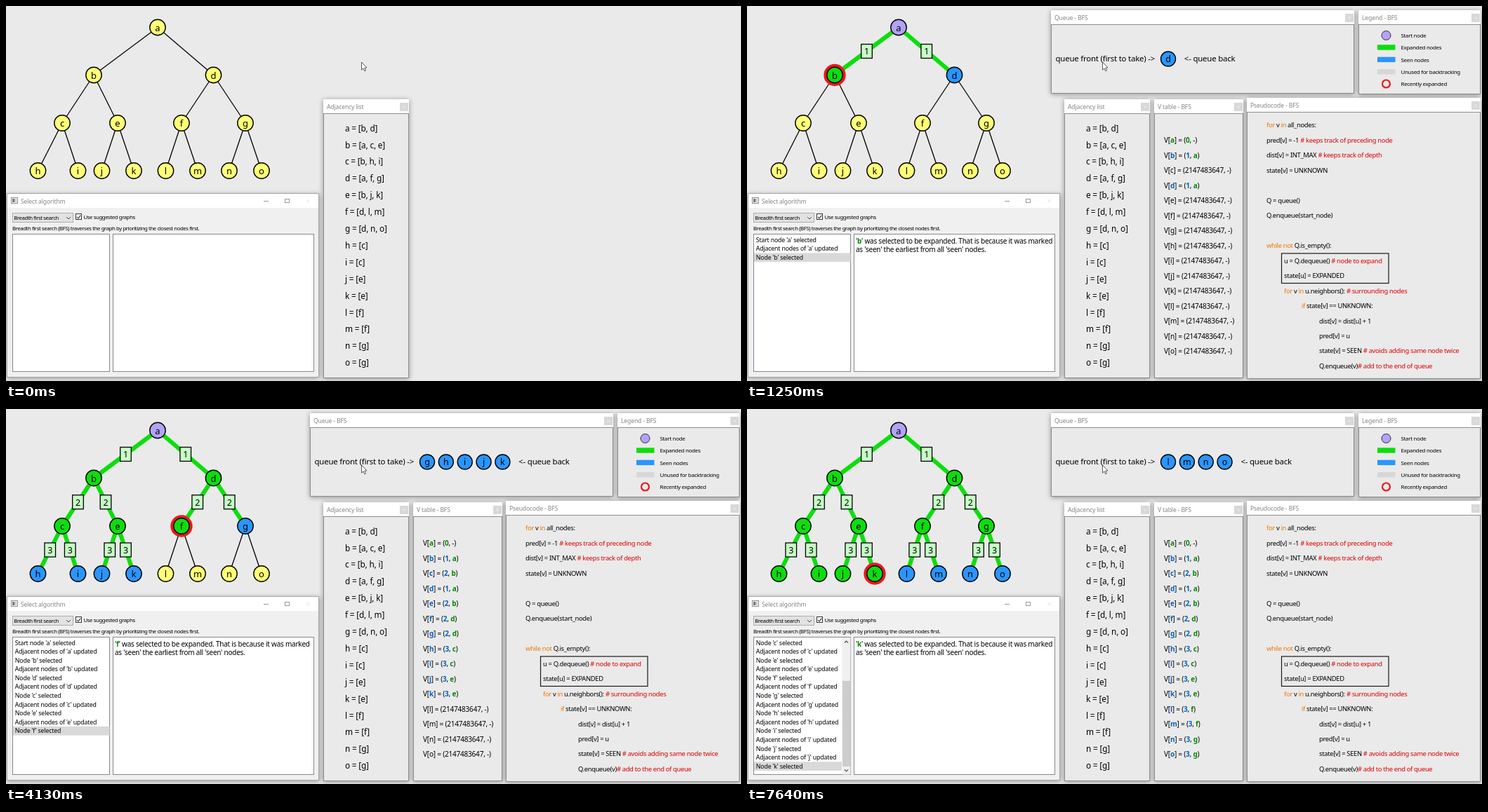
An HTML page with a canvas that plays this animation: 1047 px wide and 535 px high, repeating every 8000 ms.

```html
<!DOCTYPE html>
<html lang="en">
<head>
<meta charset="utf-8">
<title>Breadth first search</title>
<style>
  html, body { margin: 0; width: 100%; height: 100%; overflow: hidden; background: #eaeaea; }
  canvas { display: block; }
</style>
</head>
<body>
<canvas id="stage" width="1047" height="535"></canvas>
<script>
const ctx = document.getElementById('stage').getContext('2d');
const LOOP = 8000;
const OPEN = 550, READY = 640;
// start of each step: odd steps select a node, even steps update its neighbours
const TIMES = [720, 1020, 1250, 1570, 1880, 2280, 2580, 2970, 3350, 3680, 4130,
  4450, 4830, 5230, 5620, 5850, 6160, 6550, 6940, 7320, 7640];

const GREEN = '#0cde0c', BLUE = '#2a95ff', YELLOW = '#ffff78', PURPLE = '#b3a2f8';
const RED = '#f01616', ORANGE = '#ffb400', PAPER = '#eaeaea';
const INK_GREEN = '#008a00', INK_BLUE = '#0062c4', INK_RED = '#e00000', INK_ORANGE = '#f07800';

// [size, letter spacing]
const STYLE = {
  title: [8.6, -0.15], small: [7.8, -0.42], list: [8.8, -0.19], detail: [10, -0.24],
  code: [9.4, -0.33], table: [10, -0.2], adj: [11.8, -0.18], queue: [11.4, -0.19],
  legend: [7.9, -0.28], node: [13, 0], label: [12.5, 0]
};

const ORDER = 'abdcefghijklmno';
const KIDS = { a: 'bd', b: 'ce', d: 'fg', c: 'hi', e: 'jk', f: 'lm', g: 'no' };
const POS = {
  a: [216, 30.5], b: [125, 98.5], d: [295.5, 98.5],
  c: [80, 167], e: [159, 167], f: [250, 167], g: [341, 167],
  h: [45.5, 235], i: [102.5, 235], j: [136.5, 235], k: [182, 235],
  l: [227.5, 235], m: [273, 235], n: [318, 235], o: [364, 235]
};
const PARENT = {}, DEPTH = { a: 0 };
for (const p of ORDER) for (const k of KIDS[p] || '') {
  PARENT[k] = p;
  DEPTH[k] = DEPTH[p] + 1;
}

const CODE = [
  [0, 'for v in all_nodes:'],
  [0, 'pred[v] = -1 # keeps track of preceding node'],
  [0, 'dist[v] = INT_MAX # keeps track of depth'],
  [0, 'state[v] = UNKNOWN'],
  [0, ''],
  [0, 'Q = queue()'],
  [0, 'Q.enqueue(start_node)'],
  [0, ''],
  [0, 'while not Q.is_empty():'],
  [1, 'u = Q.dequeue() # node to expand'],
  [1, 'state[u] = EXPANDED'],
  [1, 'for v in u.neighbors(): # surrounding nodes'],
  [2, 'if state[v] == UNKNOWN:'],
  [3, 'dist[v] = dist[u] + 1'],
  [3, 'pred[v] = u'],
  [3, 'state[v] = SEEN # avoids adding same node twice'],
  [3, 'Q.enqueue(v)# add to the end of queue']
];

function setFont(style, bold) {
  const [size, gap] = STYLE[style];
  const weight = bold ? 700 : style === 'node' ? 500 : 400;
  ctx.font = `${weight} ${size}px "Noto Sans", "Open Sans", sans-serif`;
  ctx.letterSpacing = gap + 'px';
  return size;
}

// parts: a string or a list of [text, color, bold]; y is the middle of the line
function text(style, parts, x, y, color = '#000') {
  ctx.textAlign = 'left';
  for (const [s, c, bold] of typeof parts === 'string' ? [[parts]] : parts) {
    const size = setFont(style, bold);
    ctx.fillStyle = c || color;
    ctx.fillText(s, x, y + size * 0.35);
    x += ctx.measureText(s).width;
  }
}

function centered(style, s, x, y) {
  const size = setFont(style);
  ctx.textAlign = 'center';
  ctx.fillStyle = '#000';
  ctx.fillText(s, x, y + size * 0.36);
}

function rect(x, y, x2, y2, fill, stroke, width = 1) {
  if (fill) {
    ctx.fillStyle = fill;
    ctx.fillRect(x, y, x2 - x, y2 - y);
  }
  if (stroke) {
    ctx.strokeStyle = stroke;
    ctx.lineWidth = width;
    ctx.strokeRect(x, y, x2 - x, y2 - y);
  }
}

function path(points, color, width) {
  ctx.beginPath();
  points.forEach(p => ctx.lineTo(p[0], p[1]));
  ctx.strokeStyle = color;
  ctx.lineWidth = width;
  ctx.stroke();
}

function circle(x, y, r, fill, stroke, width) {
  ctx.beginPath();
  ctx.arc(x, y, r, 0, Math.PI * 2);
  if (fill) {
    ctx.fillStyle = fill;
    ctx.fill();
  }
  if (stroke) {
    ctx.strokeStyle = stroke;
    ctx.lineWidth = width;
    ctx.stroke();
  }
}

function frame(x, y, x2, y2, body) {
  ctx.save();
  ctx.shadowColor = 'rgba(0,0,0,.4)';
  ctx.shadowBlur = 7;
  ctx.shadowOffsetY = 1;
  rect(x, y, x2, y2, body);
  ctx.restore();
}

function panel(title, x, y, x2, y2) {
  frame(x, y, x2, y2, PAPER);
  rect(x, y, x2, y + 20, '#fff');
  rect(x + 0.5, y + 20.5, x2 - 0.5, y2 - 0.5, null, '#8c8c8c');
  const bx = x2 - 7, by = y + 11;
  rect(bx - 6, by - 6, bx + 6, by + 6, '#d8d8d8');
  path([[bx - 2, by - 2], [bx + 2, by + 2]], '#e8e8e8', 1);
  path([[bx - 2, by + 2], [bx + 2, by - 2]], '#e8e8e8', 1);
  text('title', title, x + 5, y + 10.5, '#858585');
}

// everything shown follows from the step number (0 = nothing selected yet)
function stateAt(step) {
  const cur = Math.ceil(step / 2) - 1;
  const updated = step > 0 && step % 2 === 0;
  const done = Math.floor(step / 2);
  const node = ORDER[cur];
  const found = new Set('a');
  for (const c of ORDER.slice(0, done))
    for (const k of KIDS[c] || '') found.add(k);
  const fresh = updated ? KIDS[node] || '' : '';
  const queue = step ? ORDER.slice(cur + 1, found.size) : '';
  return { step, cur, updated, node, found, fresh, queue };
}

function drawTree(s) {
  for (const k of ORDER.slice(1)) {
    const line = [POS[PARENT[k]], POS[k]];
    if (!s.found.has(k)) path(line, '#000', 1.3);
    else {
      if (s.fresh.includes(k)) path(line, ORANGE, 11);
      path(line, GREEN, 6);
    }
  }
  for (const k of ORDER) {
    const [x, y] = POS[k];
    let fill = YELLOW;
    if (s.step && s.found.has(k))
      fill = k === 'a' ? PURPLE : ORDER.indexOf(k) <= s.cur ? GREEN : BLUE;
    if (k === s.node) circle(x, y, 13.6, null, RED, 4.2);
    if (s.fresh.includes(k)) circle(x, y, 13.4, null, ORANGE, 4);
    circle(x, y, 11.2, fill, '#000', 1.4);
    centered('node', k, x, y + 0.5);
  }
  for (const k of s.found) {
    if (k === 'a') continue;
    const [x, y] = POS[k], [px, py] = POS[PARENT[k]];
    const mx = (x + px) / 2, my = (y + py) / 2;
    rect(mx - 7.8, my - 10, mx + 7.8, my + 10, '#c6ffc6', '#000', 1.3);
    centered('label', String(DEPTH[k]), mx, my + 0.3);
  }
}

function drawList(s) {
  const rows = 15, pitch = 12.58;
  const first = Math.max(0, s.step - rows);
  const right = first ? 135 : 147.5;
  for (let n = first; n < s.step; n++) {
    const y = 333.5 + (n - first) * pitch;
    const c = ORDER[n >> 1];
    if (n === s.step - 1) rect(10, y - 6.3, right, y + 6.3, '#d9d9d9');
    const name = n % 2 ? `Adjacent nodes of '${c}' updated`
      : `${n ? 'Node' : 'Start node'} '${c}' selected`;
    text('list', name, 12.8, y);
  }
  if (first) {
    rect(135.5, 326, 147.5, 521.5, '#f0f0f0');
    rect(136, 510 - 171 * rows / s.step, 147, 510, '#cdcdcd');
    path([[139, 333.5], [141.5, 331], [144, 333.5]], '#505050', 1.2);
    path([[139, 514.5], [141.5, 517], [144, 514.5]], '#505050', 1.2);
  }
}

function marked(s) {
  return s.split('*').map((t, i) => i % 2 ? [t, INK_GREEN, true] : [t]);
}

function drawDetail(s) {
  if (!s.step) return;
  const v = `'*${s.node}*'`;
  let lines;
  if (s.updated) lines = [
    `Adjacent nodes of selected node ${v} were updated. In other`,
    `words, the node ${v} was expanded. All neighbors of node ${v} that`,
    "were not expanded yet, were marked as 'seen'.", '', 'These nodes were:'];
  else if (s.step === 1) lines = [`${v} was selected as the start node.`];
  else lines = [
    `${v} was selected to be expanded. That is because it was marked`,
    "as 'seen' the earliest from all 'seen' nodes."];
  lines.forEach((l, i) => text('detail', marked(l), 155, 335 + i * 12));
  const list = [];
  [...s.fresh].forEach((c, i) => list.push([i ? ', ' : ''], [c, INK_BLUE, true]));
  text('detail', list, 155, 394.5);
}

function drawSelect(s) {
  frame(1, 268, 446, 530, '#f0f0f0');
  rect(1, 268, 446, 288, '#fff');
  rect(1.5, 267.5, 445.5, 529.5, null, '#a8a8a8');
  rect(7.5, 273.5, 16.5, 281.5, '#fff', '#8a8a8a');
  rect(9, 275, 12.5, 280, '#777');
  rect(13.5, 275, 15, 280, '#bbb');
  text('title', 'Select algorithm', 21, 278.5, '#858585');
  path([[367, 278.5], [374, 278.5]], '#999', 1);
  rect(397.5, 275.5, 403.5, 280.5, null, '#999');
  path([[428, 275.5], [433, 280.5]], '#e4e4e4', 1);
  path([[428, 280.5], [433, 275.5]], '#e4e4e4', 1);

  rect(9.5, 295.5, 95.5, 308.5, '#e2e2e2', '#adadad');
  text('small', 'Breadth first search', 11.3, 302.5);
  path([[86, 301], [89, 304], [92, 301]], '#444', 1);
  rect(99.5, 296.5, 107.5, 304.5, '#fff', '#333');
  path([[101, 300.8], [103, 303], [106.2, 298.6]], '#222', 1.1);
  text('small', 'Use suggested graphs', 110.5, 301.3);
  text('small', 'Breadth first search (BFS) traverses the graph by prioritizing the closest nodes first.', 9, 317.3);
  rect(9.5, 325.5, 147.5, 521.5, '#fff', '#858a92');
  rect(152.5, 325.5, 438.5, 521.5, '#fff', '#858a92');
  drawList(s);
  drawDetail(s);
}

function drawAdjacency() {
  panel('Adjacency list', 452, 133, 574, 531);
  [...'abcdefghijklmno'].forEach((k, i) => {
    const near = (PARENT[k] || '') + (KIDS[k] || '');
    text('adj', `${k} = [${[...near].join(', ')}]`, 483, 174.5 + i * 23.9);
  });
}

function drawQueue(s) {
  panel('Queue - BFS', 433, 6, 865, 125);
  const gap = 26.85, y = 75.5;
  text('queue', 'queue front (first to take) ->', 439.5, 75);
  [...s.queue].forEach((k, i) => {
    const x = 600 + i * gap;
    circle(x, y, 10.5, BLUE, '#000', 1.4);
    centered('label', k, x, y + 0.3);
    if (s.fresh.includes(k)) rect(x - gap / 2, 62.5, x + gap / 2, 88.5, null, ORANGE, 2.2);
  });
  text('queue', '<- queue back', 596 + s.queue.length * gap, 75);
}

function drawLegend() {
  panel('Legend - BFS', 871, 6, 1045, 126);
  circle(910.5, 42, 6.5, PURPLE, '#333', 1);
  [GREEN, BLUE, '#d7d7d7'].forEach((c, i) => rect(898, 55.3 + i * 17.4, 923.5, 62.7 + i * 17.4, c));
  circle(910.5, 111, 5.5, null, RED, 2.2);
  ['Start node', 'Expanded nodes', 'Seen nodes', 'Unused for backtracking', 'Recently expanded']
    .forEach((l, i) => text('legend', l, 931.5, 42 + i * 17.4));
}

function drawTable(s) {
  panel('V table - BFS', 580, 133, 707, 531);
  [...'abcdefghijklmno'].forEach((k, i) => {
    const known = s.found.has(k);
    const ink = k === 'a' ? INK_GREEN : INK_BLUE;
    const row = known
      ? [['V['], [k, ink, true], ['] = ('], [String(DEPTH[k]), ink, true], [', '],
        k === 'a' ? ['-'] : [PARENT[k], INK_GREEN, true], [')']]
      : `V[${k}] = (2147483647, -)`;
    text('table', row, 594, 191.5 + i * 21.5);
  });
}

function drawCode(s) {
  panel('Pseudocode - BFS', 712, 131, 1045, 532);
  CODE.forEach(([indent, line], i) => {
    const cut = (line + '#').indexOf('#');
    const parts = line.slice(0, cut).split(/\b(for|in|while not|if)\b/)
      .map((t, j) => [t, j % 2 ? INK_ORANGE : '#000']);
    parts.push([line.slice(cut), INK_RED]);
    text('code', parts, 740 + indent * 25, 170 + i * 21.48);
  });
  const box = s.updated ? [761.5, 396.5, 1020.5, 524]
    : s.step < 2 ? [737, 160, 928, 395.5] : [761.5, 353, 914, 395.5];
  rect(...box, null, '#1a1a1a', 1.2);
}

function drawCursor() {
  ctx.beginPath();
  [[506.5, 80], [506.5, 91.2], [509, 88.9], [510.8, 92.8], [512.5, 92], [510.8, 88.3], [514, 88]]
    .forEach(p => ctx.lineTo(...p));
  ctx.closePath();
  ctx.fillStyle = '#fff';
  ctx.fill();
  ctx.strokeStyle = '#333';
  ctx.lineWidth = 0.8;
  ctx.stroke();
}

function draw(t) {
  const s = stateAt(TIMES.filter(x => x <= t).length);
  rect(0, 0, 1047, 535, PAPER);
  drawTree(s);
  drawSelect(s);
  drawAdjacency();
  if (t >= OPEN) {
    ctx.globalAlpha = t < READY ? 0.5 : 1;
    drawQueue(s);
    drawLegend();
    drawTable(s);
    drawCode(s);
    ctx.globalAlpha = 1;
  }
  drawCursor();
}

const begin = performance.now();
function tick() {
  draw((performance.now() - begin) % LOOP);
  requestAnimationFrame(tick);
}
tick();
</script>
</body>
</html>
```
